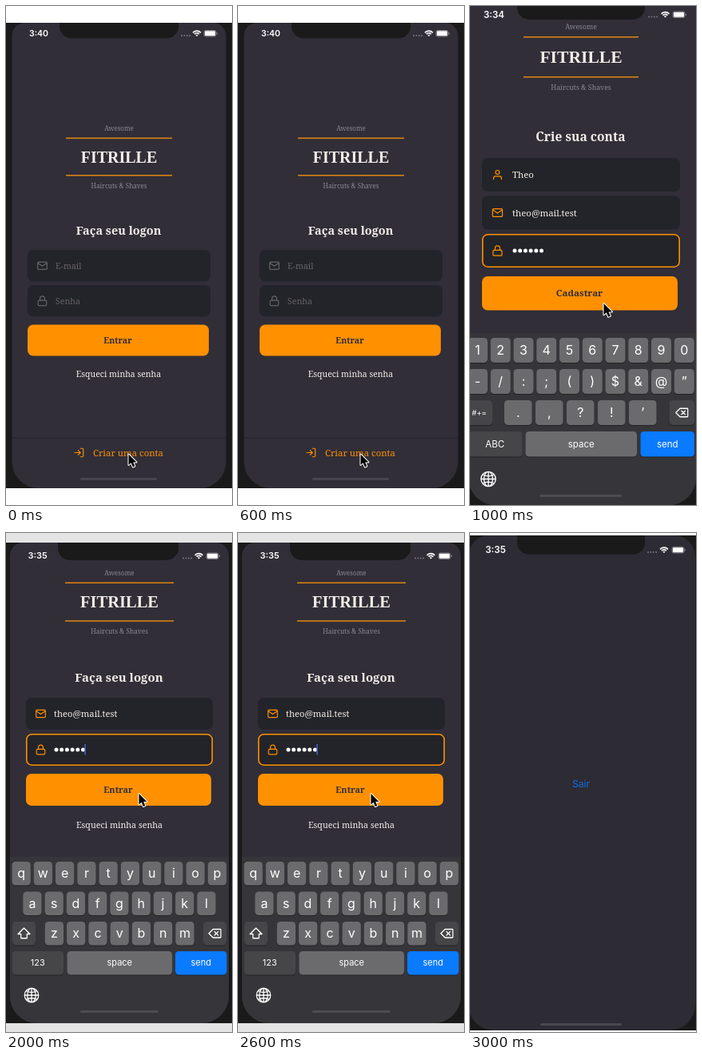
An HTML page with a canvas for the animation above (4 s loop, 283 by 624 pixels).

```html
<!DOCTYPE html>
<html lang="pt-BR">
<head>
<meta charset="utf-8">
<title>Login flow</title>
<style>
  html, body { margin: 0; width: 100%; height: 100%; overflow: hidden; background: #fff; }
  canvas { display: block; width: 283px; height: 624px; }
</style>
</head>
<body>
<canvas id="stage"></canvas>
<script>
const W = 283, H = 624, STEP = 1000;
const ORANGE = '#ff9000', SCREEN = '#312e38', FIELD = '#232429', BEZEL = '#1a1a1b';
const CREAM = '#f4ede8', MUTED = '#666368', BOARD = '#363539';
const KEY = '#6b6a6d', KEY_DARK = '#464548', BLUE = '#0a7aff';
const SERIF = '"Noto Serif", serif', SANS = 'Inter, sans-serif';
const BRAND = 'FITRILLE', USER = 'Theo', EMAIL = 'theo@mail.test';

const canvas = document.getElementById('stage');
const ctx = canvas.getContext('2d');
const ratio = window.devicePixelRatio || 1;
canvas.width = W * ratio;
canvas.height = H * ratio;

// Icons on a 24-unit grid
const ICONS = {
  mail: 'M4 4h16a2 2 0 0 1 2 2v12a2 2 0 0 1-2 2H4a2 2 0 0 1-2-2V6a2 2 0 0 1 2-2zM22 6l-10 7L2 6',
  lock: 'M5 11h14a2 2 0 0 1 2 2v7a2 2 0 0 1-2 2H5a2 2 0 0 1-2-2v-7a2 2 0 0 1 2-2zM7 11V7a5 5 0 0 1 10 0v4',
  user: 'M20 21v-2a4 4 0 0 0-4-4H8a4 4 0 0 0-4 4v2M16 7a4 4 0 1 1-8 0a4 4 0 1 1 8 0',
  login: 'M15 3h4a2 2 0 0 1 2 2v14a2 2 0 0 1-2 2h-4M10 17l5-5-5-5M15 12H3',
  erase: 'M21 5H9l-7 7 7 7h12a1 1 0 0 0 1-1V6a1 1 0 0 0-1-1zM17.5 9l-6 6M11.5 9l6 6',
  shift: 'M12 3L2 13h5v7h10v-7h5z',
  globe: 'M22 12a10 10 0 1 1-20 0a10 10 0 1 1 20 0M2 12h20M12 2a6 10 0 0 1 0 20a6 10 0 0 1 0-20M12 2v20M4.5 6q7.5 4 15 0M4.5 18q7.5-4 15 0'
};
for (const name in ICONS) ICONS[name] = new Path2D(ICONS[name]);

function rect(x, y, w, h, color) {
  ctx.fillStyle = color;
  ctx.fillRect(x, y, w, h);
}

function round(x, y, w, h, r, color) {
  ctx.beginPath();
  ctx.roundRect(x, y, w, h, r);
  ctx.fillStyle = color;
  ctx.fill();
}

function dot(x, y, r, color) {
  ctx.beginPath();
  ctx.arc(x, y, r, 0, Math.PI * 2);
  ctx.fillStyle = color;
  ctx.fill();
}

function text(str, x, y, size, color, { align = 'center', weight = 400, font = SERIF } = {}) {
  ctx.font = `${weight} ${size}px ${font}`;
  ctx.textAlign = align;
  ctx.fillStyle = color;
  ctx.fillText(str, x, y);
}

function icon(name, cx, cy, size, color, line = 2) {
  ctx.save();
  ctx.translate(cx - size / 2, cy - size / 2);
  ctx.scale(size / 24, size / 24);
  ctx.strokeStyle = color;
  ctx.lineWidth = line;
  ctx.lineCap = ctx.lineJoin = 'round';
  ctx.stroke(ICONS[name]);
  ctx.restore();
}

function phone(x, y, w, h, radii, notch, color = SCREEN) {
  rect(0, y, W, h, BEZEL);
  round(x, y, w, h, radii, color);
  const [left, right, bottom] = notch;
  round(left, y, right - left, bottom - y, [0, 0, 15, 15], BEZEL);
}

function wifi(x, y) {
  const a = -Math.PI * 0.76, b = -Math.PI * 0.24;
  ctx.strokeStyle = '#fff';
  ctx.lineCap = 'butt';
  ctx.lineWidth = 1.7;
  for (const r of [6.8, 4.1]) {
    ctx.beginPath();
    ctx.arc(x, y + 4, r, a, b);
    ctx.stroke();
  }
  ctx.beginPath();
  ctx.moveTo(x, y + 4);
  ctx.arc(x, y + 4, 2.2, a, b);
  ctx.fillStyle = '#fff';
  ctx.fill();
}

function status(time, x, y, size, dots, wifiX, battery) {
  text(time, x, y + size * 0.36, size, '#fff', { weight: 600, font: SANS });
  for (let i = 0; i < 4; i++) dot(dots + i * 3.4, y + 3, 1, '#77747c');
  wifi(wifiX, y);
  ctx.beginPath();
  ctx.roundRect(battery + 0.5, y - 3.5, 15, 7.5, 2);
  ctx.strokeStyle = '#918f96';
  ctx.lineWidth = 0.8;
  ctx.stroke();
  round(battery + 1.4, y - 2.7, 13.2, 5.9, 1.2, '#fff');
  rect(battery + 16.2, y - 1, 1, 2.5, '#918f96');
}

function header(cx, top, left, right, gap, k) {
  text('Awesome', cx, top - 9.3 * k, 8 * k, '#8a878f');
  rect(left, top - 0.8, right - left, 1.6, '#d98212');
  text(BRAND, cx, top + gap / 2 + 7, 20 * k, CREAM, { weight: 700, font: '"Liberation Serif", serif' });
  rect(left, top + gap - 0.8, right - left, 1.6, '#d98212');
  text('Haircuts & Shaves', cx, top + gap + 16, 8.1 * k, '#8a878f');
}

function title(str, x, y, size) {
  text(str, x, y, size, CREAM, { weight: 600 });
}

function field(x, y, w, h, name, label, { color = CREAM, tint = ORANGE, size = 11, focus, pad = 35, k = 1 } = {}) {
  round(x, y, w, h, 7, FIELD);
  if (focus) {
    ctx.beginPath();
    ctx.roundRect(x + 0.8, y + 0.8, w - 1.6, h - 1.6, 6.5);
    ctx.strokeStyle = ORANGE;
    ctx.lineWidth = 1.6;
    ctx.stroke();
  }
  const cy = y + h / 2;
  icon(name, x + 18.5 * k, cy, 14 * k, tint);
  if (label) text(label, x + pad, cy + 4, size, color, { align: 'left' });
  else for (let i = 0; i < 6; i++) dot(x + pad + 3 + i * 6.7, cy, 2.5, '#fff');
}

function button(x, y, w, h, label, size) {
  round(x, y, w, h, 7, ORANGE);
  text(label, x + w / 2 - 0.5, y + h / 2 + 4, size, SCREEN, { weight: 600 });
}

function cursor(x, y, k = 1) {
  ctx.save();
  ctx.translate(x, y);
  ctx.scale(k, k);
  const arrow = new Path2D('M0 0V13.6L3.2 10.8 5.4 16 7.9 15 5.7 9.9H10z');
  ctx.lineJoin = 'round';
  ctx.strokeStyle = '#fff';
  ctx.lineWidth = 2;
  ctx.stroke(arrow);
  ctx.fillStyle = '#000';
  ctx.fill(arrow);
  ctx.restore();
}

function key(x, y, w, h, label, { color = KEY, size = 16, glyph } = {}) {
  round(x, y + 1, w, h, 4.5, '#232225');
  round(x, y, w, h, 4.5, color);
  if (glyph) icon(glyph, x + w / 2, y + h / 2, 18, '#fff', 1.7);
  else text(label, x + w / 2, y + h / 2 + size * 0.34, size, '#fff', { font: SANS });
}

function keyRow(labels, x, y, pitch, w, h) {
  [...labels].forEach((c, i) => key(x + i * pitch, y, w, h, c));
}

function indicator(x, y, w, color) {
  round(x, y - 1.6, w, 3.2, 1.6, color);
}

function welcome() {
  phone(7.5, 21, 268, 582, [16, 16, 33, 33], [67, 216, 40.5]);
  status('3:40', 41, 34, 10.6, 220, 239, 247.5);
  header(141.5, 165.3, 75, 208, 46.5, 1);
  title('Faça seu logon', 141, 286, 14.5);
  const idle = { color: MUTED, tint: MUTED, size: 10.6 };
  field(27, 305, 229, 39.5, 'mail', 'E-mail', idle);
  field(27, 349, 229, 39.5, 'lock', 'Senha', idle);
  button(27, 398.5, 227, 39, 'Entrar', 10.6);
  text('Esqueci minha senha', 141, 464, 10.5, CREAM);
  rect(7.5, 539.5, 268, 1, '#25232a');
  icon('login', 91.5, 558.5, 14, ORANGE);
  text('Criar uma conta', 153, 563, 11.4, ORANGE);
  indicator(93, 591.5, 96, '#47454c');
  cursor(153.5, 560.5);
}

function signUp() {
  phone(-2, 0, 285, 624, [0, 0, 34, 34], [59, 219, 17]);
  status('3:34', 30, 10.5, 11.6, 224, 244.5, 253.5);
  header(139, 38.8, 67, 211, 50, 1.08);
  title('Crie sua conta', 138.5, 168.5, 15.6);
  const opts = { size: 11.4, pad: 38, k: 1.05 };
  field(15, 190, 248, 42, 'user', USER, opts);
  field(15, 237.5, 248, 42, 'mail', EMAIL, opts);
  field(15, 285, 248, 42, 'lock', '', { ...opts, focus: true });
  button(15, 338, 245, 42.5, 'Cadastrar', 11.6);

  round(-2, 409, 285, 215, [0, 0, 34, 34], BOARD);
  keyRow('1234567890', -3, 415, 28.75, 25, 31);
  keyRow('-/:;()$&@”', -3, 454, 28.75, 25, 31);
  key(-5, 493, 33, 31, '#+=', { color: KEY_DARK, size: 9.5 });
  keyRow('.,?!’', 43, 493, 39, 34.5, 31);
  key(249.5, 493, 31.5, 31, '', { color: KEY_DARK, glyph: 'erase' });
  key(-3, 532, 68.5, 31.5, 'ABC', { color: KEY_DARK, size: 11.5 });
  key(69.5, 532, 139.5, 31.5, 'space', { size: 11.5 });
  key(213.5, 532, 67.5, 31.5, 'send', { color: BLUE, size: 11.5 });
  icon('globe', 23, 591.5, 22, '#fff', 1.5);
  indicator(87, 612.5, 103, '#4d4c50');
  cursor(167.5, 372, 1.05);
}

function signIn() {
  rect(0, 0, W, H, '#e4e4e4');
  phone(5, 12, 274, 601, [16, 16, 34, 34], [65, 216, 34]);
  status('3:35', 39.5, 28.5, 11, 222, 241.5, 250.5);
  header(142, 62.3, 74, 210, 47.7, 1.025);
  title('Faça seu logon', 141.5, 186, 15);
  field(25, 206, 234, 40, 'mail', EMAIL, { size: 11.2 });
  field(25, 251, 234, 40, 'lock', '', { focus: true });
  rect(98.3, 264, 1.5, 13.5, '#4264d8');
  button(25, 301, 232, 40, 'Entrar', 10.9);
  text('Esqueci minha senha', 142, 368.5, 10.7, CREAM);

  round(5, 405, 274, 208, [0, 0, 34, 34], BOARD);
  keyRow('qwertyuiop', 7.5, 411, 27.25, 23.3, 29.5);
  keyRow('asdfghjkl', 21.3, 448.5, 27.25, 23.3, 29.5);
  key(8, 486, 29, 29.5, '', { color: KEY_DARK, glyph: 'shift' });
  keyRow('zxcvbnm', 48.8, 486, 27.25, 23.3, 29.5);
  key(247, 486, 29, 29.5, '', { color: KEY_DARK, glyph: 'erase' });
  key(7.5, 523, 64.5, 29.5, '123', { color: KEY_DARK, size: 11 });
  key(76.5, 523, 131.5, 29.5, 'space', { size: 11 });
  key(212, 523, 64.5, 29.5, 'send', { color: BLUE, size: 11 });
  icon('globe', 32, 578, 21, '#fff', 1.5);
  indicator(93, 598.5, 98, '#4d4c50');
  cursor(166.5, 326);
}

function signedIn() {
  phone(-2, 3, 284, 619, [26, 26, 32, 32], [59, 219, 27], '#2d2b33');
  status('3:35', 32, 21, 11.6, 223, 243, 252.5);
  text('Sair', 139, 317.5, 12.2, '#0a6fe6', { font: SANS });
  indicator(88, 614.5, 102, '#4a484e');
}

const scenes = [welcome, signUp, signIn, signedIn];

function draw() {
  const t = performance.now() % (STEP * scenes.length);
  ctx.setTransform(ratio, 0, 0, ratio, 0, 0);
  rect(0, 0, W, H, '#fff');
  scenes[Math.floor(t / STEP)]();
  requestAnimationFrame(draw);
}
draw();
</script>
</body>
</html>
```
